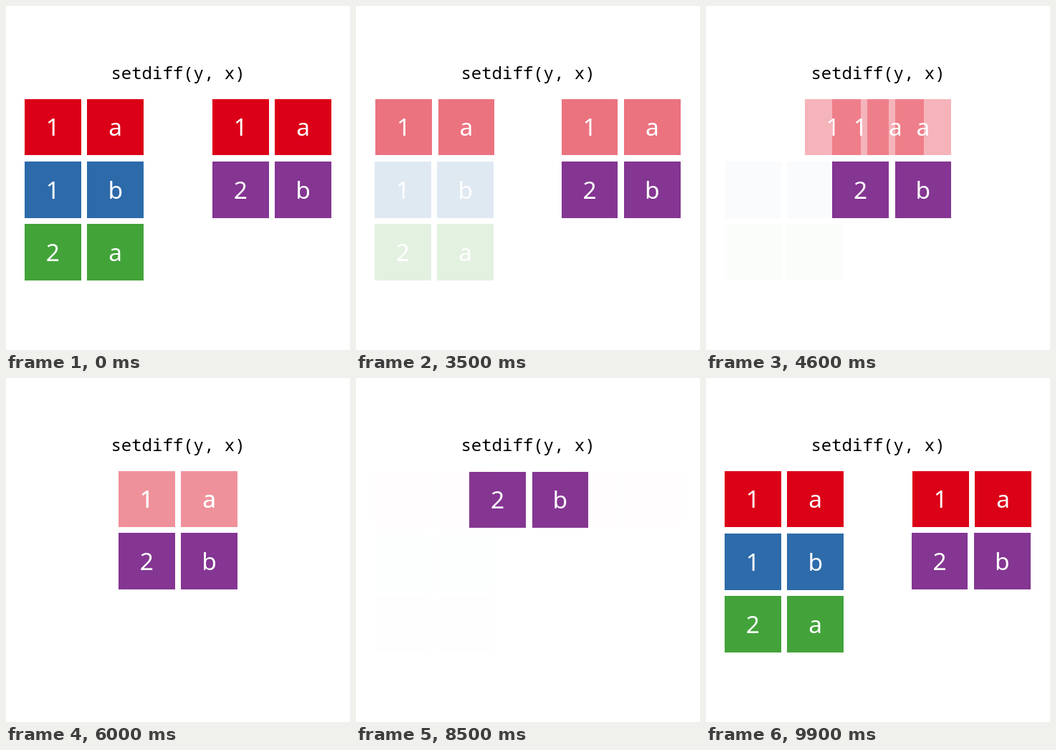
An HTML page with a canvas for the animation above (10 s loop, 480x480 px).

```html
<!DOCTYPE html>
<html lang="en">
<head>
<meta charset="utf-8">
<title>setdiff(y, x)</title>
<style>
  html, body { margin: 0; width: 100%; height: 100%; overflow: hidden; background: #fff; }
  canvas { display: block; width: 480px; height: 480px; }
</style>
</head>
<body>
<canvas id="stage" width="480" height="480"></canvas>
<script>
const ctx = document.getElementById('stage').getContext('2d');

const FRAME = 100, LOOP_FRAMES = 100;
const PHASE_FRAMES = 25, REST_FRAMES = 9, MOVE_FRAMES = 16;
const PITCH = 87.3, TILE = 78.57, LEFT = 26.12, TOP = 129.75;

const RED = '#db0017', BLUE = '#2c6aaa', GREEN = '#42a339', PURPLE = '#843692';

// Per state: grid column, grid row, tile opacity, label opacity.
const shared = x => [[x, 0, 1, 1], [x, 0, .55, 1], [1.5, 0, .25, 1], [x, 0, 0, 0]];
const dropped = y => [[0, y, 1, 1], [0, y, .15, 1], [0, y, 0, 0], [0, y, 0, 0]];
const rows = [
  { color: RED, labels: '1a', states: shared(0) },
  { color: BLUE, labels: '1b', states: dropped(1) },
  { color: GREEN, labels: '2a', states: dropped(2) },
  { color: RED, labels: '1a', states: shared(3) },
  { color: PURPLE, labels: '2b', states: [[3, 1, 1, 1], [3, 1, 1, 1], [1.5, 1, 1, 1], [1.5, 0, 1, 1]] }
];
const kept = rows[4];

const mix = (a, b, p) => a + (b - a) * p;
const sineInOut = p => (1 - Math.cos(Math.PI * p)) / 2;

function pose(row, phase, p) {
  const from = row.states[phase], to = row.states[(phase + 1) % 4];
  const [x, y, tileAlpha, labelAlpha] = from.map((v, i) => mix(v, to[i], p));
  // Shared rows fade out where they merged, and fade in at home.
  const home = row !== kept && phase === 3;
  const gone = row !== kept && phase === 2;
  return {
    row, tileAlpha, labelAlpha,
    x: LEFT + PITCH * (home ? to[0] : gone ? from[0] : x),
    y: TOP + PITCH * y
  };
}

function drawTile(x, y) {
  const l = Math.round(x), t = Math.round(y);
  ctx.fillRect(l, t, Math.round(x + TILE) - l, Math.round(y + TILE) - t);
}

function draw(time) {
  const frame = Math.floor(time / FRAME) % LOOP_FRAMES;
  const phase = Math.floor(frame / PHASE_FRAMES);
  const step = frame % PHASE_FRAMES - REST_FRAMES;
  // The last transition lands exactly on the loop point.
  const p = sineInOut(Math.max(0, step) / MOVE_FRAMES);

  ctx.globalAlpha = 1;
  ctx.fillStyle = '#fff';
  ctx.fillRect(0, 0, 480, 480);
  ctx.textAlign = 'center';
  ctx.fillStyle = '#000';
  ctx.font = '24px "Noto Sans Mono", monospace';
  ctx.fillText('setdiff(y, x)', 240, 102);

  // Returning rows appear above the kept row.
  const order = phase === 3 ? [kept, ...rows.slice(0, 4)] : rows;
  const poses = order.map(row => pose(row, phase, p));
  for (const { row, x, y, tileAlpha } of poses) {
    ctx.globalAlpha = tileAlpha;
    ctx.fillStyle = row.color;
    drawTile(x, y);
    drawTile(x + PITCH, y);
  }
  ctx.fillStyle = '#fff';
  ctx.font = '33.5px "Noto Sans", sans-serif';
  for (const { row, x, y, labelAlpha } of poses) {
    ctx.globalAlpha = labelAlpha;
    [...row.labels].forEach((label, i) =>
      ctx.fillText(label, x + TILE / 2 + i * PITCH, y + 51.5));
  }
}

function tick() {
  draw(performance.now());
  requestAnimationFrame(tick);
}
tick();
</script>
</body>
</html>
```
